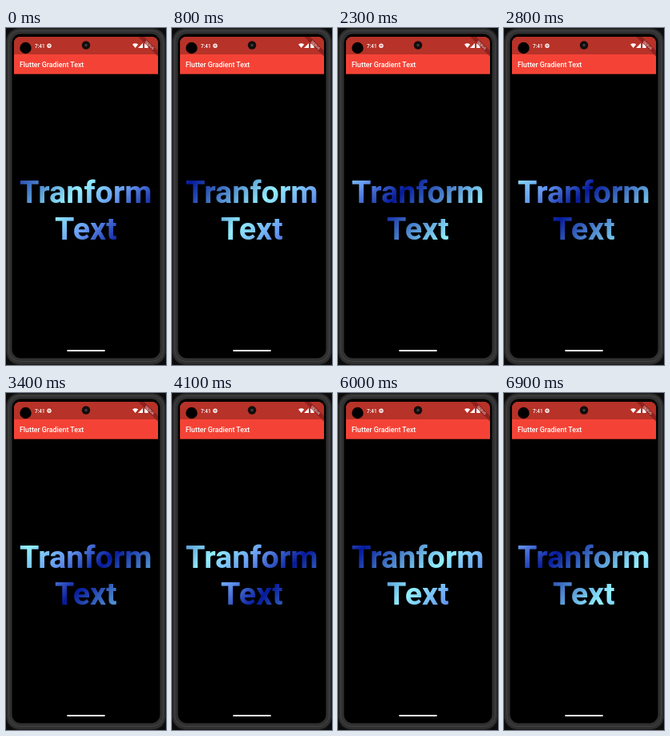
An HTML page that plays this animation: 200 px wide and 422 px high, repeating every 7000 ms.

```html
<!DOCTYPE html>
<html lang="en">
<head>
<meta charset="utf-8">
<title>Gradient Text</title>
<style>
  html, body { margin: 0; height: 100%; overflow: hidden; background: #0c0c0c; }
  svg { display: block; width: 100vw; height: 100vh; font-family: Roboto, sans-serif; }
  .headline { font-size: 39.5px; font-weight: 700; text-anchor: middle; }
</style>
</head>
<body>
<svg viewBox="0 0 200 422">
  <defs>
    <linearGradient id="wave" gradientUnits="userSpaceOnUse" spreadMethod="repeat"
      x1="99" y1="228" x2="213.5" y2="342.5">
      <stop stop-color="#92effd"/>
      <stop offset=".25" stop-color="#6698f0"/>
      <stop offset=".5" stop-color="#061a9c"/>
      <stop offset="1" stop-color="#92effd"/>
    </linearGradient>
    <clipPath id="screen"><rect x="10" y="11" width="180" height="399" rx="8"/></clipPath>
  </defs>

  <!-- phone body -->
  <rect x=".5" y=".5" width="199" height="421" rx="16" fill="#303030" stroke="#1c1c1c"/>
  <rect x="3.5" y="3.5" width="193" height="414" rx="14" fill="none" stroke="#444"/>
  <rect x="7.5" y="7.5" width="185" height="406" rx="11"/>

  <g clip-path="url(#screen)">
    <rect x="10" y="11" width="180" height="46.7" fill="#f44336"/>
    <rect x="10" y="11" width="180" height="22" fill="#b73228"/>

    <!-- status bar -->
    <g fill="#fff">
      <text x="36" y="24.6" font-size="6.4" font-weight="500">7:41</text>
      <circle cx="54" cy="22.2" r="2.7"/>
      <path d="M158 20.6q3.6-2.8 7.2 0l-3.6 4.4zM171 19v6h-6zM173.2 19.6h1.3v-.8h1.8v.8h1.3V25h-4.4z"/>
    </g>
    <circle cx="54" cy="22.2" r="1.1" fill="none" stroke="#b73228" stroke-width=".7"/>

    <g transform="translate(190 11) rotate(45)">
      <rect x="-17.5" y="12.3" width="35" height="5.2" fill="#841b1b" fill-opacity=".7"/>
      <text y="16.5" font-size="4.4" font-weight="700" text-anchor="middle" fill="#fff" fill-opacity=".65">DEBUG</text>
    </g>

    <text x="17" y="49" font-size="8.8" font-weight="500" fill="#fff">Flutter Gradient Text</text>
    <circle cx="24.5" cy="25" r="7.2"/>
    <rect x="76.2" y="403" width="47.6" height="2" rx="1" fill="#fff"/>
  </g>
  <circle cx="100" cy="21.5" r="5.2" fill="#120d0d"/>
  <circle cx="100" cy="21.5" r="1.8" fill="#3c3c3c"/>

  <g class="headline" fill="url(#wave)">
    <text x="99.8" y="219">Tranform</text>
    <text x="99.8" y="265">Text</text>
  </g>
</svg>
<script>
  const LOOP = 7000, STEP = 100, CYCLE = 5000, PERIOD = 229, START = -33;
  const wave = document.getElementById('wave');

  function draw(now) {
    const time = Math.floor(now % LOOP / STEP) * STEP;
    // The wave runs along the diagonal, so both axes take half the shift.
    const shift = (START + PERIOD * time / CYCLE) / 2;
    wave.setAttribute('gradientTransform', `translate(${shift} ${shift})`);
    requestAnimationFrame(draw);
  }
  draw(performance.now());
</script>
</body>
</html>
```
